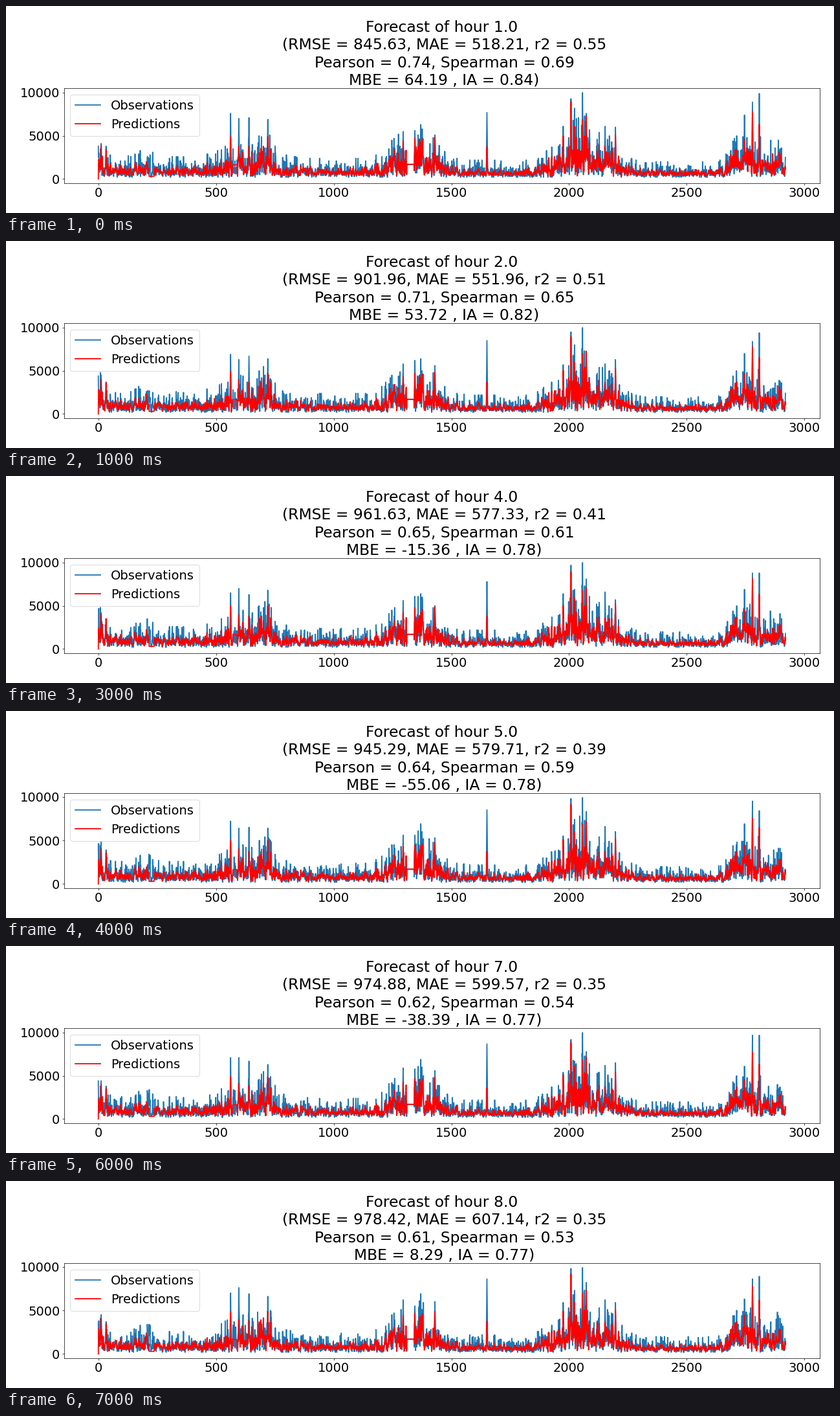
These frames come from a looping animation (1280 by 320 pixels, 8 s). A matplotlib script:

```python
import numpy as np
import matplotlib.pyplot as plt
from matplotlib.animation import FuncAnimation

WIDTH, HEIGHT, DPI = 1280, 320, 64
N = 2920
HOURS = 8
FONT = 22

plt.rcParams["font.family"] = "DejaVu Sans"
plt.rcParams["font.size"] = FONT
plt.rcParams["lines.linewidth"] = 2

# rmse, mae, r2, pearson, spearman, mbe, ia
SCORES = [
    (845.63, 518.21, 0.55, 0.74, 0.69, 64.19, 0.84),
    (901.96, 551.96, 0.51, 0.71, 0.65, 53.72, 0.82),
    (938.14, 566.42, 0.46, 0.68, 0.63, 21.47, 0.80),
    (961.63, 577.33, 0.41, 0.65, 0.61, -15.36, 0.78),
    (945.29, 579.71, 0.39, 0.64, 0.59, -55.06, 0.78),
    (962.37, 590.14, 0.37, 0.63, 0.57, -49.72, 0.77),
    (974.88, 599.57, 0.35, 0.62, 0.54, -38.39, 0.77),
    (978.42, 607.14, 0.35, 0.61, 0.53, 8.29, 0.77),
]

# busy seasons: centre, spread, height
SEASONS = [
    (8, 18, 1900), (200, 30, 800), (630, 90, 1800), (715, 25, 1500),
    (1285, 55, 2200), (1385, 55, 2700), (1930, 40, 1300),
    (2040, 40, 4500), (2150, 55, 2700), (2720, 35, 2700),
    (2795, 25, 3200), (2875, 25, 2700),
]

# main peaks: index, observed, predicted
PEAKS = [
    (12, 4200, 4000), (33, 3800, 3500), (562, 7300, 4900),
    (597, 7000, 4000), (640, 6600, 3800), (720, 6400, 4900),
    (1295, 6000, 4400), (1345, 5700, 4700), (1370, 6700, 4200),
    (1430, 5400, 4800), (1651, 8300, 3700), (1975, 5600, 5000),
    (2008, 9600, 8900), (2023, 7300, 6000), (2057, 9900, 6900),
    (2073, 7700, 7200), (2153, 6200, 3700), (2197, 6000, 5200),
    (2745, 6700, 4500), (2779, 9000, 7900), (2808, 9200, 6400),
]

# stretches where the forecast stays flat: start, end, level
PLATEAUS = [(216, 238, 300), (572, 590, 1650), (1311, 1342, 1700)]

index = np.arange(N)
envelope = 1700 - 0.23 * index + sum(
    height * np.exp(-0.5 * ((index - centre) / spread) ** 2)
    for centre, spread, height in SEASONS)


def smooth_noise(rng, width=3):
    kernel = np.hanning(2 * width + 1)
    noise = np.convolve(rng.normal(size=N), kernel, mode="same")
    return noise / noise.std()


def add_peak(series, i, value):
    near = slice(i - 2, i + 3)
    shape = value * np.array([0.35, 0.7, 1, 0.7, 0.35])
    series[near] = np.maximum(series[near], shape)


def top_value(hour):
    return 9900 if hour in (5, 6, 8) else 10000


shared = np.random.default_rng(11)
shared_wave = smooth_noise(shared)
shared_jitter = shared.normal(size=N)
shared_error = shared.normal(size=N)


def make_series(hour):
    rng = np.random.default_rng(100 + hour)
    wave = 0.95 * shared_wave + 0.3 * smooth_noise(rng)
    level = np.clip(0.52 + 0.17 * wave + 0.13 * shared_jitter, 0, 1)
    pred = 350 + (envelope - 350) * level ** 1.6
    error = 0.8 * shared_error + 0.6 * rng.normal(size=N)
    obs = pred * np.exp(0.47 * np.clip(error, -2.6, 2.4))
    obs = np.clip(obs, 150, 1.15 * envelope + 700)

    for i, observed, predicted in PEAKS:
        add_peak(obs, i, observed * (1 + 0.06 * rng.normal()))
        add_peak(pred, i, predicted * (1 + 0.02 * rng.normal()))
    for start, end, value in PLATEAUS:
        pred[start:end] = value
    start, end, value = PLATEAUS[-1]
    obs[start:end] = value
    pred[0] = 0

    top = top_value(hour)
    obs = np.minimum(np.round(obs, -2), top - 100)
    obs[2057] = top
    return obs, pred


def title_lines(hour):
    rmse, mae, r2, pearson, spearman, mbe, ia = SCORES[hour - 1]
    return (
        f"Forecast of hour {hour:.1f}",
        f"(RMSE = {rmse:.2f}, MAE = {mae:.2f}, r2 = {r2:.2f}",
        f"Pearson = {pearson:.2f}, Spearman = {spearman:.2f}",
        f"MBE = {mbe:.2f} , IA = {ia:.2f})",
    )


fig = plt.figure(figsize=(WIDTH / DPI, HEIGHT / DPI), dpi=DPI, facecolor="white")
left, right, top, bottom = 89.6, 1258, 127.3, 274.1
ax = fig.add_axes([left / WIDTH, 1 - bottom / HEIGHT,
                   (right - left) / WIDTH, (bottom - top) / HEIGHT])
obs_line, = ax.plot([], [], color="tab:blue", label="Observations")
pred_line, = ax.plot([], [], color="red", label="Predictions")
margin = 0.05 * (N - 1)
ax.set_xlim(-margin, N - 1 + margin)
ax.set_xticks(range(0, 3001, 500))
ax.set_yticks([0, 5000, 10000])
ax.legend(loc="upper left")

# the lines below the heading sit half a space further right
centre = (left + right) / 2
titles = [
    fig.text((centre + (3.7 if k else 0)) / WIDTH, 1 - (39.6 + 27.5 * k) / HEIGHT,
             "", ha="center", va="baseline", fontsize=1.2 * FONT)
    for k in range(4)
]


def draw(frame):
    hour = frame + 1
    obs, pred = make_series(hour)
    obs_line.set_data(index, obs)
    pred_line.set_data(index, pred)
    peak = top_value(hour)
    ax.set_ylim(-0.05 * peak, 1.05 * peak)
    for text, line in zip(titles, title_lines(hour)):
        text.set_text(line)
    return [obs_line, pred_line, *titles]


anim = FuncAnimation(fig, draw, frames=HOURS, interval=1000,
                     repeat=True, repeat_delay=0, blit=False)
plt.show()
```
